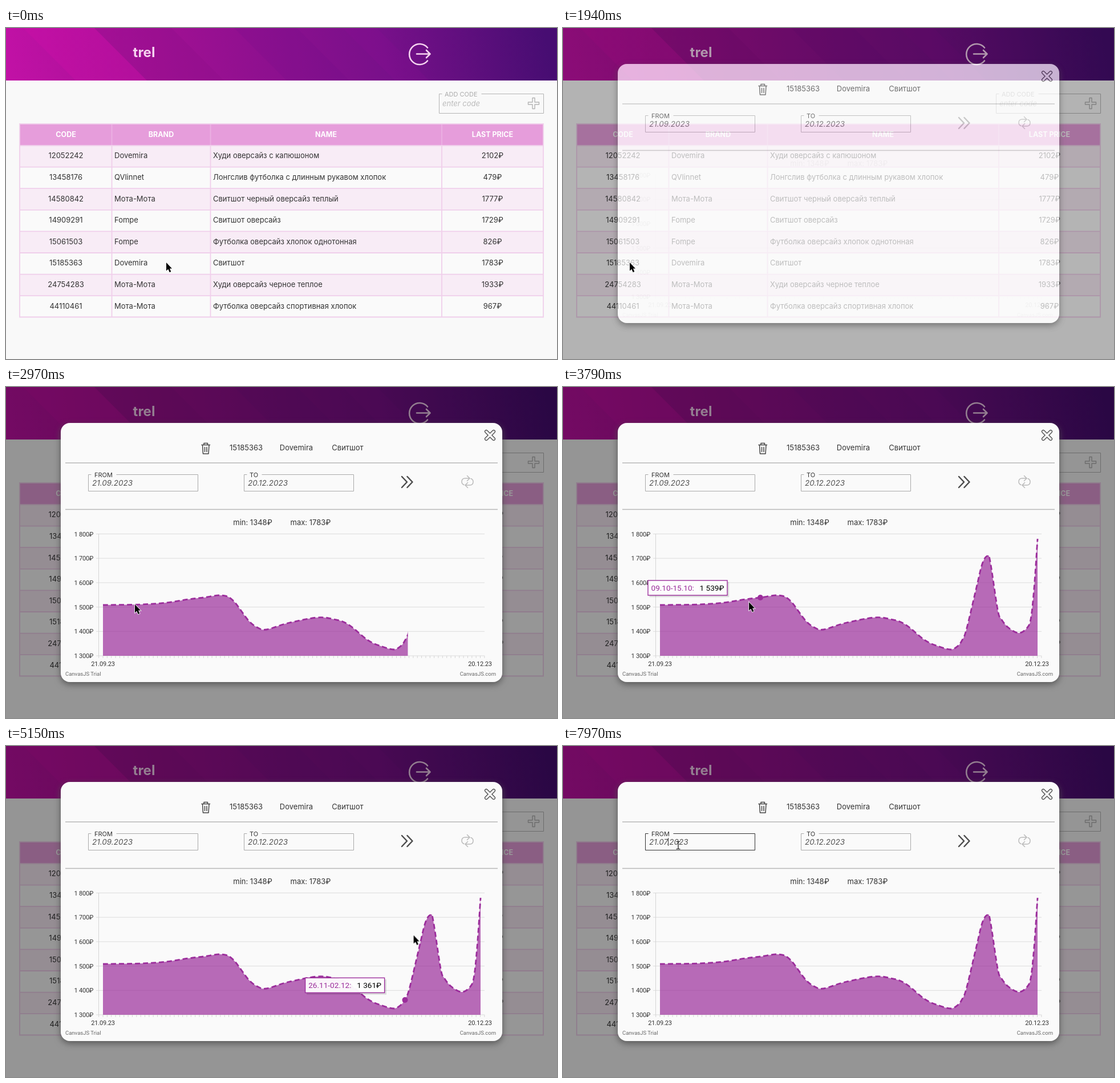
An HTML page that plays this animation: 966x580 px, repeating every 8 s.

```html
<!DOCTYPE html>
<html lang="ru">
<head>
<meta charset="utf-8">
<title>Price tracker</title>
<style>
html, body { margin: 0; width: 100%; height: 100%; overflow: hidden; background: #f9f9f9; }
svg { display: block; width: 966px; height: 580px; }
text { font: 13px Inter, sans-serif; fill: #333; white-space: pre; }
.mid { text-anchor: middle; }
.end { text-anchor: end; }
.head { font-weight: 700; font-size: 12.5px; fill: #fff; }
.user { font-weight: 700; font-size: 24px; fill: #f6d3f0; }
.legend { font-size: 11px; }
.hint, .date { font-style: italic; }
.hint { fill: #bbb; }
.date { font-size: 13.5px; fill: #555; }
.axis { font: 11px Roboto, sans-serif; letter-spacing: -.2px; }
.credit { font: 9.5px Roboto, sans-serif; fill: #666; }
.tip text { font: 13.6px Roboto, sans-serif; fill: #000; }
.tip .span { fill: #9b2d9b; }
.line { fill: none; stroke-linecap: round; stroke-linejoin: round; }
.hover { fill: #9b2d9b; }
.card { filter: drop-shadow(0 4px 6px rgba(80, 80, 80, .9)); }

.shade, .modal, .chart, .chevron, .wipe, .tips, .cursor { animation: 8s linear infinite; }
.shade, .modal { animation-name: fade; }
.chart { animation-name: appear; }
.chevron { animation-name: ready; }
.wipe { animation-name: wipe; }
.tips { animation-name: tips; }
.cursor { animation-name: cursor; }

@keyframes fade { 0%, 21.6% { opacity: 0 } 25.4%, 100% { opacity: 1 } }
@keyframes appear { 0%, 24% { opacity: 0 } 27.9%, 100% { opacity: 1 } }
@keyframes ready {
  0%, 28% { opacity: .4 } 30.5%, 91.6% { opacity: 1 }
  93%, 93.75% { opacity: .4 } 96%, 100% { opacity: 1 }
}
@keyframes wipe { 0%, 28.03% { width: 0 } 39.4%, 100% { width: 676px } }
@keyframes tips {
  0%, 47.2% { transform: translate(145px, 339px); animation-timing-function: ease }
  49.5% { transform: translate(196px, 331px); animation-timing-function: ease }
  52% { transform: translate(248px, 337px); animation-timing-function: ease }
  54.9% { transform: translate(292px, 384px); animation-timing-function: ease }
  57.25% { transform: translate(343px, 376px); animation-timing-function: ease }
  59.5%, 62.9% { transform: translate(395px, 366px) }
  63.75% { transform: translate(480px, 398px) }
  64.4% { transform: translate(525px, 406px) }
  65% { transform: translate(545px, 407px); animation-timing-function: ease }
  67.4%, 100% { transform: translate(596px, 260px) }
}
@keyframes cursor {
  0%, 9.2% { transform: translate(281px, 411px); animation-timing-function: ease-in-out }
  15.4%, 31.3% { transform: translate(117px, 411px); animation-timing-function: ease-in-out }
  37.1%, 45% { transform: translate(226px, 381px); animation-timing-function: ease-in }
  47.4% { transform: translate(327px, 377px) }
  55.4% { transform: translate(493px, 404px); animation-timing-function: ease-out }
  59.5%, 62% { transform: translate(557px, 403px); animation-timing-function: ease-in }
  64.4% { transform: translate(716px, 331px); animation-timing-function: ease-out }
  67.4%, 71.8% { transform: translate(738px, 304px); animation-timing-function: ease-in }
  74.5% { transform: translate(620px, 142px) }
  77.4% { transform: translate(400px, 126px); animation-timing-function: ease-out }
  81.4%, 98.9% { transform: translate(184px, 167px) }
  99.6%, 100% { transform: translate(202px, 174px) }
}
</style>
</head>
<body>
<svg viewBox="0 0 966 580">
  <defs>
    <linearGradient id="bar" gradientUnits="userSpaceOnUse" x1="0" y1="92" x2="935" y2="-60">
      <stop offset="0" stop-color="#c211a6"/>
      <stop offset=".3" stop-color="#a01093"/>
      <stop offset=".7" stop-color="#78108a"/>
      <stop offset="1" stop-color="#470d72"/>
    </linearGradient>
    <clipPath id="reveal"><rect class="wipe" x="163" y="250" width="0" height="221.5"/></clipPath>
    <clipPath id="top"><rect width="966" height="92"/></clipPath>
  </defs>

  <rect width="966" height="580" fill="#f9f9f9"/>
  <g clip-path="url(#top)">
    <rect width="966" height="92" fill="url(#bar)"/>
    <path d="M30 0H155L247 92H122Z" fill="#d010a8" opacity=".3"/>
    <path d="M155 0H290L382 92H247Z" fill="#8b0f88" opacity=".3"/>
    <path d="M400 0H510L602 92H492Z" fill="#650e80" opacity=".12"/>
    <path d="M590 0H650L742 92H682Z" fill="#a0109a" opacity=".1"/>
  </g>
  <text class="user mid" x="242" y="51">trel</text>
  <g class="line" stroke="#f6d3f0" stroke-width="2.6">
    <path d="M739 34.5A18 18 0 1 0 739 57.5"/>
    <path d="M720 45.5H743M737 39L743.5 45.5L737 52"/>
  </g>

  <g id="page"></g>
  <text class="hint" x="765" y="137">enter code</text>
  <path class="line" stroke="#b4b4b4" stroke-width="1.4"
    d="M923 122.500h4v7.500h7.500v4h-7.500v7.500h-4v-7.500h-7.500v-4h7.500Z"/>

  <!-- The dimming leaves the dialog's own area untouched. -->
  <path class="shade" fill-opacity=".4" fill-rule="evenodd"
    d="M0 0H966V580H0ZM112 63H854A16 16 0 0 1 870 79V501A16 16 0 0 1 854 517H112A16 16 0 0 1 96 501V79A16 16 0 0 1 112 63Z"/>
  <g class="modal">
    <rect class="card" x="96" y="63" width="774" height="454" rx="16" fill="#fafafa"/>
    <g class="line">
      <path d="M842 78L855 91M855 78L842 91" stroke="#555" stroke-width="6.200"/>
      <path d="M842 78L855 91M855 78L842 91" stroke="#fafafa" stroke-width="3.400"/>
      <path d="M343 101.500H357.500M347 101V98.500H353.500V101M344.500 102L345.500 117H355L356 102M348.500 105.500V113.500M352 105.500V113.500"
        stroke="#444" stroke-width="1.500"/>
      <g stroke="#bbb" stroke-width="1.500">
        <path id="half" d="M803 171.500Q799 170 799 166Q799 160 805 160H812.500M808.500 155.500L813 160L808.500 164.500"/>
        <use href="#half" transform="rotate(180 809 166)"/>
      </g>
      <path class="chevron" d="M694 157L703 166.500L694 176M703.500 157L712.500 166.500L703.500 176" stroke="#4d4d4d" stroke-width="2.500"/>
    </g>
    <text class="mid" x="421" y="111">15185363</text>
    <text class="mid" x="509" y="111">Dovemira</text>
    <text class="mid" x="599" y="111">Свитшот</text>
    <path d="M104 133H862M104 214.500H862" stroke="#b8b8b8" stroke-width="1.500"/>
    <g id="fields"></g>
    <text class="date" x="424" y="173">20.12.2023</text>
    <g class="chart">
      <text class="mid" x="432.500" y="241.500">min: 1348₽</text>
      <text class="mid" x="534" y="241.500">max: 1783₽</text>
      <g id="grid"></g>
      <text class="axis mid" x="170" y="489">21.09.23</text>
      <text class="axis mid" x="831" y="489">20.12.23</text>
      <text class="credit" x="104" y="506">CanvasJS Trial</text>
      <text class="credit end" x="859" y="506">CanvasJS.com</text>
      <g clip-path="url(#reveal)">
        <path id="area" fill="#9b2d9b" fill-opacity=".7"/>
        <path id="curve" fill="none" stroke="#9b2d9b" stroke-width="2.800" stroke-dasharray="9 5"/>
      </g>
    </g>
  </g>
  <g id="marks"></g>
  <g class="tips" id="tips"></g>

  <g class="cursor">
    <circle class="press" r="12" fill="#ff0" fill-opacity=".47"/>
    <circle class="press" r="11.500" fill="#ff0" fill-opacity=".47"/>
    <path class="arrow" d="M0 0V14.500L3.300 11.600L5.700 17L8.300 15.900L6 10.600H10Z" stroke="#fff" stroke-width="1.600" paint-order="stroke"/>
    <path class="beam" d="M-3.500 -6.500H-1L0 -5.500L1 -6.500H3.500M0 -5.500V5.500M-3.500 6.500H-1L0 5.500L1 6.500H3.500" fill="none" stroke="#111" stroke-width="1.200"/>
  </g>
</svg>
<script>
const LOOP = 8000;
const $ = s => document.querySelector(s);
const add = (parent, tag, attrs, content = '') => {
  const el = document.createElementNS('http://www.w3.org/2000/svg', tag);
  for (const k in attrs) el.setAttribute(k, attrs[k]);
  el.textContent = content;
  return parent.appendChild(el);
};
const label = (parent, x, y, str, cls = '') => add(parent, 'text', { x, y, class: cls }, str);

// Visible only between two moments of the loop.
const show = (el, from, to = LOOP) => {
  const key = (ms, opacity) => ({ opacity, offset: ms / LOOP, easing: 'step-end' });
  const keys = [key(from, 1)];
  if (from > 0) keys.unshift(key(0, 0));
  if (to < LOOP) keys.push(key(to, 0));
  keys.push(key(LOOP, to < LOOP ? 0 : 1));
  el.animate(keys, { duration: LOOP, iterations: Infinity });
  return el;
};

// Outlined box with a legend set into its top edge.
const field = (parent, x, y, w, h, gap, stroke) => add(parent, 'path', {
  d: `M${x + gap} ${y}H${x + w}V${y + h}H${x}V${y}H${x + 5}`, fill: 'none', stroke
});

const page = $('#page');
field(page, 759.5, 115.5, 183, 34, 74, '#b4b4b4');
label(page, 769, 119.5, 'ADD CODE', 'legend').style.fill = '#aaa';

const rows = [
  ['12052242', 'Dovemira', 'Худи оверсайз с капюшоном', 2102],
  ['13458176', 'QVlinnet', 'Лонгслив футболка с длинным рукавом хлопок', 479],
  ['14580842', 'Мота-Мота', 'Свитшот черный оверсайз теплый', 1777],
  ['14909291', 'Fompe', 'Свитшот оверсайз', 1729],
  ['15061503', 'Fompe', 'Футболка оверсайз хлопок однотонная', 826],
  ['15185363', 'Dovemira', 'Свитшот', 1783],
  ['24754283', 'Мота-Мота', 'Худи оверсайз черное теплое', 1933],
  ['44110461', 'Мота-Мота', 'Футболка оверсайз спортивная хлопок', 967]
];
const ROW = 37.6;
add(page, 'rect', { x: 24, y: 168, width: 918, height: 38, fill: '#e69ddb' });
rows.forEach(([code, brand, name, price], i) => {
  const y = 206 + i * ROW, base = y + 22.3;
  add(page, 'rect', { x: 24, y, width: 918, height: ROW, fill: i % 2 ? '#fafafa' : '#f8ecf6' });
  label(page, 105, base, code, 'mid');
  label(page, 190, base, brand);
  label(page, 363, base, name);
  label(page, 853, base, price + '₽', 'mid');
  if (i === 5) show(label(page, 105, base, code, 'mid hover'), 1130, 1760);
});
const rules = rows.map((_, i) => `M24 ${206 + i * ROW}H942`).join('');
const stroke = (d, color) => add(page, 'path', { d, fill: 'none', stroke: color, 'stroke-width': 1.8 });
stroke('M185.500 168V206M358.500 168V206M764 168V206', '#ebb1e3');
stroke(`M24 168H942V506.500H24ZM185.500 206V506M358.500 206V506M764 206V506${rules}`, '#f0cfeb');
[['CODE', 105], ['BRAND', 272], ['NAME', 561], ['LAST PRICE', 853]]
  .forEach(([str, x]) => label(page, x, 190.5, str, 'head mid'));

const fields = $('#fields');
field(fields, 144.5, 153.5, 192, 29, 49, '#aaa');
field(fields, 417.5, 153.5, 192, 29, 31, '#aaa');
show(field(fields, 144.5, 153.5, 192, 29, 49, '#333'), 6770);
label(fields, 155, 157.5, 'FROM', 'legend');
label(fields, 427, 157.5, 'TO', 'legend');
[['21.09.2023', 0, 7330], ['21.0.2023', 7330, 7500], ['21.07.2023', 7500, LOOP]]
  .forEach(([str, from, to]) => show(label(fields, 151, 173, str, 'date'), from, to));
const caret = (x, from, to) =>
  show(add(fields, 'path', { d: `M${x} 161V175`, stroke: '#333' }), from, to);
caret(184.5, 6770, 7330);
caret(176.5, 7330, 7500);
caret(184.5, 7500);

const grid = $('#grid');
for (let i = 0; i < 6; i++) {
  const y = 257.5 + i * 42.7;
  add(grid, 'path', { d: `M158 ${y}H839`, stroke: '#dcdcdc' });
  label(grid, 153, y + 4, `1 ${800 - i * 100}₽`, 'axis end');
}
let ticks = 'M162.500 257V471';
for (let i = -1; i < 92; i++) ticks += `M${170 + i * 7.35} 471V475`;
add(grid, 'path', { d: ticks, stroke: '#d4d4d4' });

// Smooth curve through the price points.
const pts = [
  [170, 382], [236, 381], [280, 378], [320, 372], [346, 369], [378, 365], [398, 374], [425, 409],
  [442, 422], [457, 425], [493, 414], [545, 404], [575, 407], [600, 416], [635, 444], [660, 455],
  [680, 460], [692, 454], [699, 445], [707, 426], [724, 355], [735, 310], [744, 296], [749, 306],
  [762, 390], [768, 406], [780, 421], [798, 431], [812, 424], [820, 407], [826, 352], [832, 266]
];
let curve = `M${pts[0]}`;
for (let i = 1; i < pts.length; i++) {
  const a = pts[i - 2] || pts[i - 1], b = pts[i - 1], c = pts[i], d = pts[i + 1] || c;
  const c1 = b.map((v, k) => v + (c[k] - a[k]) / 6);
  const c2 = c.map((v, k) => v - (d[k] - b[k]) / 6);
  curve += `C${c1} ${c2} ${c}`;
}
$('#curve').setAttribute('d', curve);
$('#area').setAttribute('d', curve + 'V471H170Z');

const tips = $('#tips');
const stops = [
  [295, 377, '02.10-08.10', 520, 3660],
  [346, 369, '09.10-15.10', 539, 3780],
  [398, 374, '16.10-22.10', 526, 3970],
  [442, 422, '22.10-28.10', 415, 4180],
  [493, 414, '29.10-04.11', 434, 4400],
  [545, 404, '05.11-11.11', 457, 4570],
  [648, 450, '19.11-25.11', 349, 5030],
  [699.5, 445, '26.11-02.12', 361, 5100],
  [746, 298, '03.12-09.12', 705, 5200]
];
stops.forEach(([cx, cy, span, price, from], i) => {
  const to = i + 1 < stops.length ? stops[i + 1][4] : 5890;
  show(add($('#marks'), 'circle', { cx, cy, r: 5, fill: '#9b2d9b' }), from, to);
  const tip = show(add(tips, 'g', { class: 'tip' }), from, to);
  add(tip, 'rect', { x: 3, y: 3, width: 140, height: 27, fill: '#000', opacity: .12 });
  add(tip, 'rect', { x: .5, y: .5, width: 139, height: 26, fill: '#fff', 'fill-opacity': .95, stroke: '#9b2d9b', 'stroke-width': 1.4 });
  label(tip, 6, 18.5, span + ':', 'span');
  label(tip, 134, 18.5, `1 ${price}₽`, 'end');
});

const [press1, press2] = document.querySelectorAll('.press');
show(press1, 1490, 1700);
show(press2, 6770, 6990);
show($('.arrow'), 0, 6330);
show($('.beam'), 6330);
</script>
</body>
</html>
```
